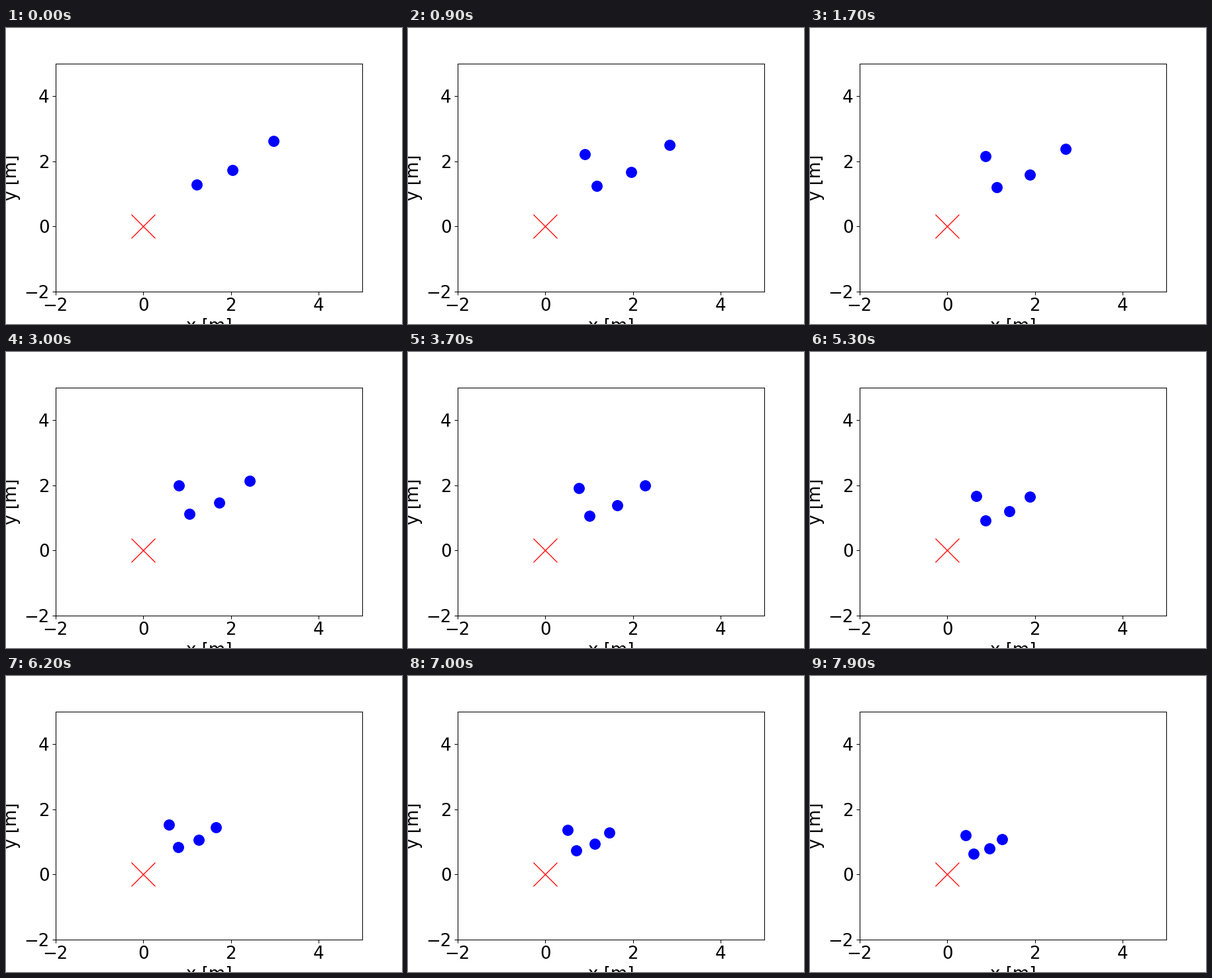
Recreate the animation shown at these times as a matplotlib script. Size 598 by 448 pixels, loop 8000 ms.

```python
import matplotlib.pyplot as plt
import numpy as np
from matplotlib.animation import FuncAnimation

W, H, DPI = 598, 448, 93.4375
FRAMES, INTERVAL = 80, 100

plt.rcParams["font.family"] = "DejaVu Sans"
plt.rcParams["font.size"] = 20

# Waypoints (seconds, metres) of each agent on its way to the goal
T = np.array([0, 1.7, 3.0, 4.4, 5.3, 7.0, 7.9])
PATHS = [
    ([2.973, 2.694, 2.434, 2.109, 1.875, 1.478, 1.248],
     [2.615, 2.367, 2.144, 1.852, 1.647, 1.278, 1.075]),
    ([2.037, 1.878, 1.729, 1.544, 1.410, 1.130, 0.970],
     [1.728, 1.590, 1.464, 1.306, 1.194, 0.941, 0.795]),
    ([1.221, 1.133, 1.056, 0.951, 0.881, 0.704, 0.596],
     [1.284, 1.196, 1.107, 0.998, 0.922, 0.734, 0.628]),
    ([0.926, 0.874, 0.810, 0.727, 0.655, 0.507, 0.413],
     [2.298, 2.150, 1.998, 1.809, 1.663, 1.377, 1.192]),
]
CURVES = [[np.polyfit(T, c, 3) for c in path] for path in PATHS]

# The small margin keeps the pixel size from being rounded down
fig, ax = plt.subplots(figsize=((W + 0.01) / DPI, (H + 0.01) / DPI), dpi=DPI)
ax.set(xlim=(-2, 5), ylim=(-2, 5), xlabel="x [m]", ylabel="y [m]",
       xticks=[-2, 0, 2, 4], yticks=[-2, 0, 2, 4])
ax.plot(0, 0, "rx", markersize=28, markeredgewidth=1)
dots, = ax.plot([], [], "bo", markersize=12)


def update(i):
    # The last agent joins one step after the others
    active = CURVES if i > 0 else CURVES[:-1]
    t = i * INTERVAL / 1000
    dots.set_data([np.polyval(cx, t) for cx, _ in active],
                  [np.polyval(cy, t) for _, cy in active])
    return dots,


anim = FuncAnimation(fig, update, frames=FRAMES, interval=INTERVAL,
                     repeat=True, repeat_delay=0)
plt.show()
```
